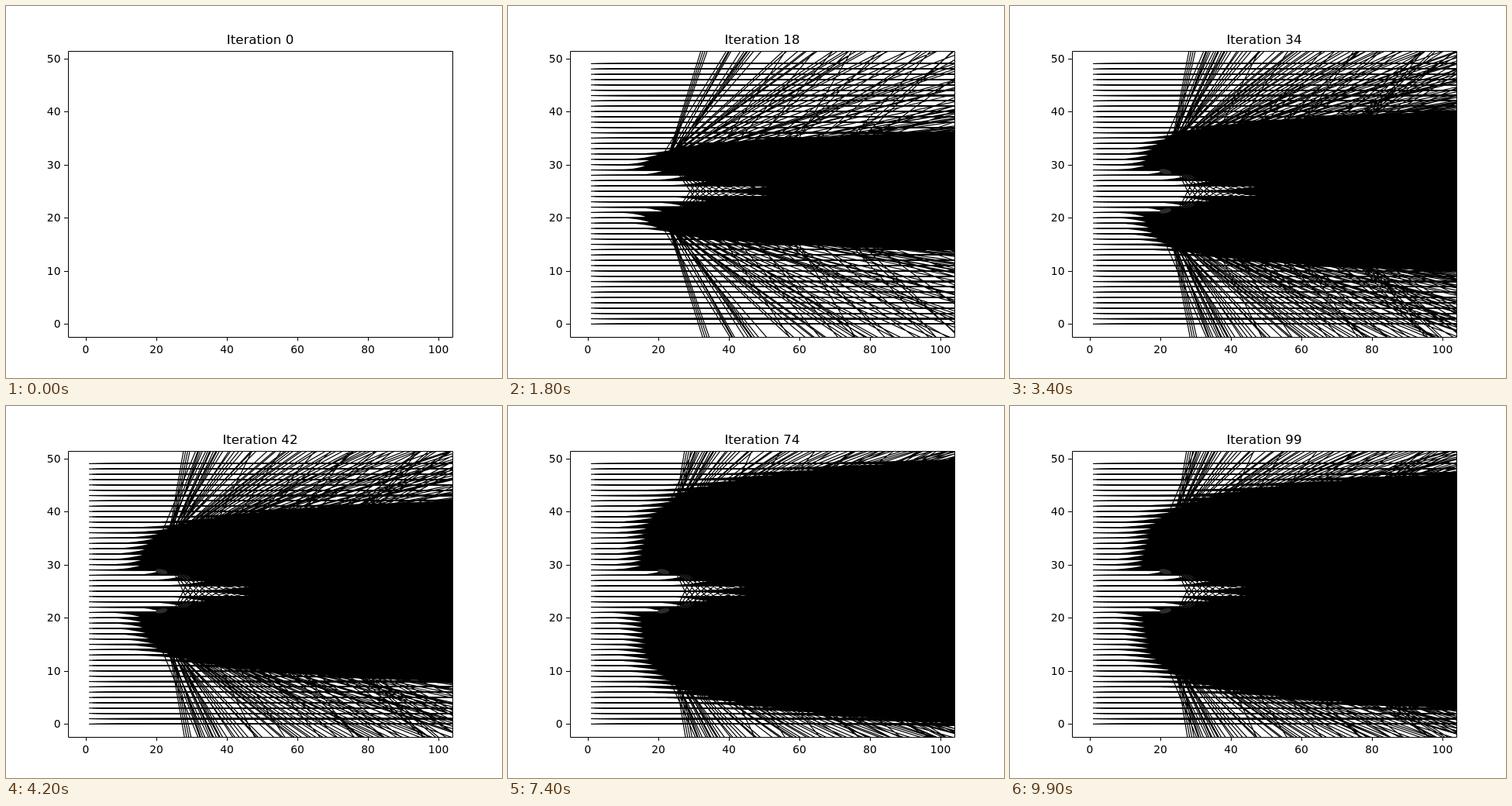
An HTML page with a canvas that plays this animation: 640x480 px, repeating every 10 s.

```html
<!DOCTYPE html>
<html lang="en">
<head>
<meta charset="utf-8">
<title>Flow field</title>
<style>
  html, body { margin: 0; width: 100%; height: 100%; overflow: hidden; background: #fff; }
  canvas, svg { position: absolute; left: 0; top: 0; width: 640px; height: 480px; }
  text { font: 13.89px "DejaVu Sans", Verdana, sans-serif; fill: #000; }
  #title { font-size: 16.67px; }
  path { fill: none; stroke: #000; stroke-width: 1; }
</style>
</head>
<body>
<canvas id="field" width="640" height="480"></canvas>
<svg id="axes" viewBox="0 0 640 480">
  <path d="M80.5 58.5H576.5V427.5H80.5Z"/>
  <text id="title" x="328" y="49" text-anchor="middle">Iteration 0</text>
</svg>
<script>
const ctx = document.getElementById('field').getContext('2d');
const axes = document.getElementById('axes');
const title = document.getElementById('title');
const MID = 25, RIGHT = 104, TOP = 26.4, UNIT = 6.857, LINE = 1.19;
const px = x => 102.55 + 4.5546 * x;
const py = y => 410.4 - UNIT * y;

function addSvg(tag, attrs, label = '') {
  const el = document.createElementNS('http://www.w3.org/2000/svg', tag);
  for (const key in attrs) el.setAttribute(key, attrs[key]);
  el.textContent = label;
  axes.append(el);
}

for (let v = 0; v <= 100; v += 20) {
  const x = Math.round(px(v));
  addSvg('path', { d: `M${x + .5} 427v5` });
  addSvg('text', { x, y: 448, 'text-anchor': 'middle' }, v);
}
for (let v = 0; v <= 50; v += 10) {
  const y = Math.round(py(v));
  addSvg('path', { d: `M80 ${y + .5}h-5` });
  addSvg('text', { x: 70.5, y: y + 5, 'text-anchor': 'end' }, v);
}

let seed = 11;
function rand() {
  seed = (seed * 16807) % 2147483647;
  return seed / 2147483647;
}

// Rays thrown outward from the edge of the obstacle
const RAYS = 170;
const rays = Array.from({ length: RAYS }, (_, k) => {
  const far = k > 12 && rand() < .22;
  return {
    k, far,
    show: rand(),
    ox: far ? 30 + 50 * rand() : 19 + 5 * rand(),
    jitter: rand(),
    reach: 14 + 34 * rand()
  };
});

// Half height of the disturbed zone at the right edge
function zone(n) {
  const grow = n < 75 ? 6 + .24 * n : 24 - .12 * (n - 75);
  return grow * (1 - Math.exp(-n / 2));
}

const edge = (x, a) => a * (.37 + .14 * Math.log(Math.max(.4, x - 15)));

// Where the row at distance d from the middle becomes solid
function front(d, a, n) {
  if (d === 0) return 44 + 150 / n;
  const outer = 16 + Math.exp(Math.min(12, (d / a - .37) / .14));
  return Math.max(outer, d < 5 ? 41 - 6.3 * d : 0);
}

// One arrow per cell: overlapping thin lines darken toward the right
function drawArrows(row) {
  const y = py(row) - LINE / 2;
  for (let x = 1; x < 100; x++) ctx.fillRect(px(x), y, 500, LINE);
}

// The arrows of a row tilt outward and fill the gap to the next row
function drawWedge(row, side, a, n) {
  const d = Math.abs(row - MID);
  const end = front(d, a, n);
  const power = d < 4 ? 5 : 2.2 + 40 / n;
  const y = py(row);
  ctx.beginPath();
  ctx.moveTo(px(1), y);
  for (let x = 1; x <= RIGHT; x++) {
    const swell = Math.min(1.05, ((x - 1) / (end - 1)) ** power);
    ctx.lineTo(px(x), y - side * UNIT * swell);
  }
  ctx.lineTo(px(RIGHT), y);
  ctx.fill();
}

function drawRay(x, d, slope, side) {
  const x2 = 110;
  ctx.moveTo(px(x), py(MID + side * d));
  ctx.lineTo(px(x2), py(MID + side * (d + slope * (x2 - x))));
}

function drawRays(side, a, n) {
  const first = 27.5 + 39.5 * Math.exp(-n / 8.4);
  const gap = 2 + 14 * Math.exp(-n / 18);
  const density = Math.min(1, n / 5) * Math.min(1, .3 + .7 * n / 32);
  for (const r of rays) {
    if (r.k < 4) {
      if (n > 1) {
        const x = 22.3 + .2 * r.k, d = 5.4;
        drawRay(x, d, (TOP - d) / (first + .6 * r.k - x), side);
      }
      continue;
    }
    if (r.show > density) continue;
    const w = (r.k - 4 + r.jitter) / RAYS;
    let hit = first + gap + 20 * (Math.exp(4 * w) - 1);
    if (r.far) hit = Math.max(hit * .6, r.ox + r.reach);
    const d = .8 * edge(r.ox, a);
    drawRay(r.ox, d, (TOP - d) / (hit - r.ox), side);
  }
}

// Rays that cross the wake behind the obstacle
function drawCrossing(side, n) {
  const start = 26.7 + 13 * Math.exp(-n / 8.4);
  for (let k = 1; k <= 12; k++) {
    const cross = start + .9 * k ** 1.3;
    drawRay(24, 5, -5 / (cross - 24), side);
  }
}

function drawHaze(x, d, rx, ry) {
  for (const side of [1, -1]) {
    ctx.beginPath();
    ctx.ellipse(px(x), py(MID + side * d), rx, ry, side * .2, 0, 7);
    ctx.fill();
  }
}

function draw(n) {
  title.textContent = 'Iteration ' + n;
  ctx.clearRect(0, 0, 640, 480);
  if (n === 0) return;
  const a = zone(n);
  ctx.save();
  ctx.beginPath();
  ctx.rect(80, 58, 496, 369);
  ctx.clip();
  ctx.fillStyle = ctx.strokeStyle = '#000';
  ctx.lineWidth = LINE;
  for (let row = 0; row < 50; row++) {
    drawArrows(row);
    if (row >= MID) drawWedge(row, 1, a, n);
    if (row <= MID) drawWedge(row, -1, a, n);
  }
  if (n > 20) {
    ctx.fillStyle = '#2c2c2c';
    drawHaze(21.5, 3.7, 8, 3);
    drawHaze(28, 2.7, 9, 3);
  }
  ctx.beginPath();
  for (const side of [1, -1]) {
    drawRays(side, a, n);
    if (n > 2) drawCrossing(side, n);
  }
  ctx.stroke();
  ctx.restore();
}

let shown = -1;
const begin = performance.now();
function tick() {
  const n = Math.floor((performance.now() - begin) / 100) % 100;
  if (n !== shown) draw(shown = n);
  requestAnimationFrame(tick);
}
tick();
</script>
</body>
</html>
```
